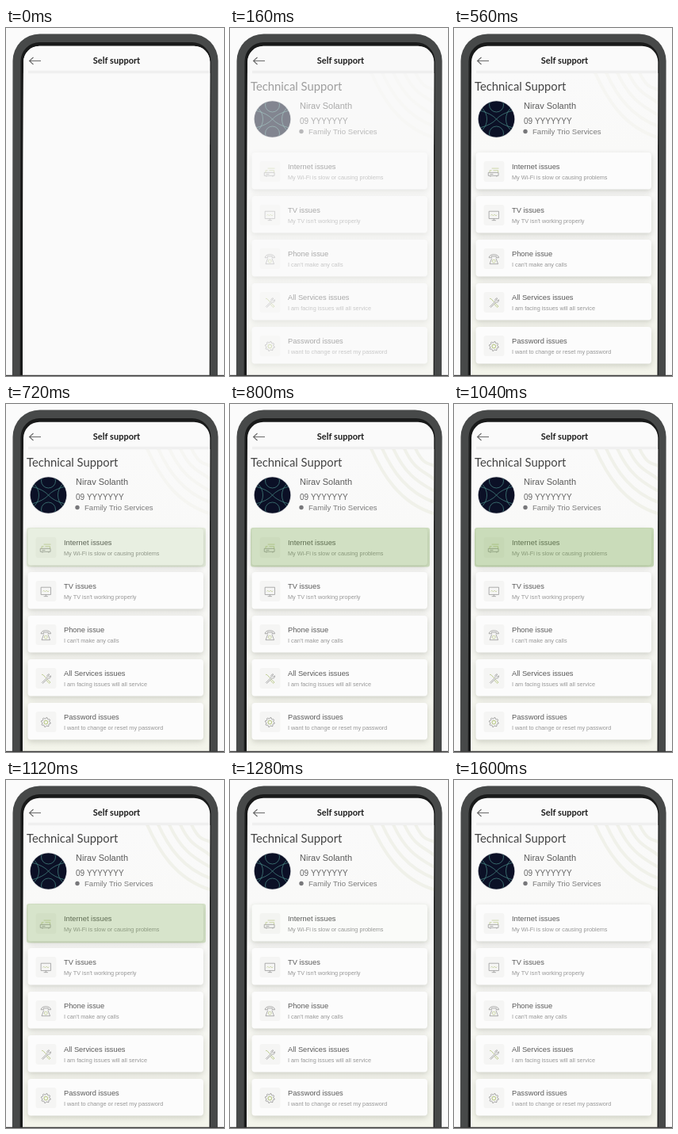
An HTML page with a canvas for the animation above (3040 ms loop, 275 by 439 pixels).

```html
<!DOCTYPE html>
<html lang="en">
<head>
<meta charset="utf-8">
<title>Self support</title>
<style>
html, body { margin: 0; width: 100%; height: 100%; overflow: hidden; background: #fbfbfb; }
canvas { display: block; width: 100vw; height: 100vh; }
</style>
</head>
<body>
<canvas id="stage"></canvas>
<script>
const W = 275, H = 439, LOOP = 3040, STEP = 80;
const SANS = '"Liberation Sans", Arial, sans-serif';
const LATO = 'Lato, "Open Sans", sans-serif';
const canvas = document.getElementById('stage');
const ctx = canvas.getContext('2d');

const CARDS = [
  ['Internet issues', 'My Wi-Fi is slow or causing problems', router],
  ['TV issues', "My TV isn't working properly", tv],
  ['Phone issue', "I can't make any calls", phone],
  ['All Services issues', 'I am facing issues will all service', tools],
  ['Password issues', 'I want to change or reset my password', gear]
];
const GREY = '#8f8f8f', GREEN = '#b9c886', TEAL = 'rgba(84,160,152,.75)';

// Highlight strength over time: [ms, amount]
const GLOW = [[640, 0], [720, 0.38], [800, 0.78], [880, 1], [960, 1],
  [1040, 0.9], [1120, 0.68], [1200, 0.32], [1280, 0.04], [1360, 0]];

function lerpKeys(keys, t) {
  if (t <= keys[0][0]) return keys[0][1];
  for (let i = 1; i < keys.length; i++) {
    const [t0, a] = keys[i - 1], [t1, b] = keys[i];
    if (t <= t1) return a + (b - a) * (t - t0) / (t1 - t0);
  }
  return keys[keys.length - 1][1];
}

function box(x, y, w, h, r, fill) {
  ctx.beginPath();
  ctx.roundRect(x, y, w, h, r);
  ctx.fillStyle = fill;
  ctx.fill();
}

function dot(x, y, r, fill) {
  ctx.beginPath();
  ctx.arc(x, y, r, 0, Math.PI * 2);
  ctx.fillStyle = fill;
  ctx.fill();
}

function ring(x, y, r, color, width = 0.8) {
  ctx.beginPath();
  ctx.arc(x, y, r, 0, Math.PI * 2);
  ctx.strokeStyle = color;
  ctx.lineWidth = width;
  ctx.stroke();
}

function line(d, color, width = 0.8) {
  ctx.strokeStyle = color;
  ctx.lineWidth = width;
  ctx.stroke(new Path2D(d));
}

function label(str, x, y, font, color, align = 'left') {
  ctx.font = font;
  ctx.fillStyle = color;
  ctx.textAlign = align;
  ctx.fillText(str, x, y);
}

function linear(x0, y0, x1, y1, ...colors) {
  const g = ctx.createLinearGradient(x0, y0, x1, y1);
  colors.forEach((c, i) => g.addColorStop(i / (colors.length - 1), c));
  return g;
}

// Icons are centred on the origin
function router() {
  line('M-8 1H6.5V5.5H-8ZM-5 5.5V7M4 5.5V7M-5.5 3.3H-1', GREY);
  line('M-6 1V-2H-3M-3-5H7M-1-2H6V1', GREEN);
}

function tv() {
  line('M-7-6H7V4.5H-7ZM-3 7H3M0 4.5V7', GREY);
  line('M-4.5 0L-3-1.5L-1 .5L1-1.5L3 .5L4.5-1', GREEN);
}

function phone() {
  line('M-7-2C-7-8 7-8 7-2H3.4V-4H-3.4V-2Z', GREY);
  line('M-3-1L-6 7H6L3-1', GREY);
  ring(0, 3, 2.2, GREEN);
}

function tools() {
  line('M-6 6L2-2M-4.6 7L3.2-.6M2-2C1-6 4-7 5-6.2L3.5-4L5-2.5L7-4.2C7.5-1 5 0 3.2-.6', GREY);
  line('M-6-6L-4-5.5L.5-.8M2 1L6.5 5.2L5 6.7L.7 2.5', GREEN, 1);
}

function gear() {
  ctx.beginPath();
  for (let i = 0; i < 32; i++) {
    const a = (i + 0.5) * Math.PI / 16, r = i % 4 < 2 ? 6.8 : 5.2;
    ctx.lineTo(r * Math.cos(a), r * Math.sin(a));
  }
  ctx.closePath();
  ctx.strokeStyle = GREY;
  ctx.lineWidth = 0.9;
  ctx.stroke();
  ring(0, 0, 2.6, GREEN, 1.3);
}

function avatar() {
  ctx.save();
  ctx.translate(53.5, 115);
  dot(0, 0, 23.6, '#d9dadc');
  dot(0, 0, 22.8, '#0b1026');
  ctx.clip();
  for (const s of [-1, 1]) {
    ring(0, 18 * s, 9, TEAL);
    ring(31 * s, 0, 19, TEAL);
    line(`M-21 ${-11 * s}Q-6 ${-7 * s} 0 0T21 ${11 * s}`, TEAL);
  }
  ctx.restore();
}

function phonePath(x0, x1, y, r, lean) {
  ctx.beginPath();
  ctx.moveTo(x0 - lean, H + 2);
  ctx.lineTo(x0, y + r);
  ctx.arcTo(x0, y, x0 + r, y, r);
  ctx.lineTo(x1 - r, y);
  ctx.arcTo(x1, y, x1, y + r, r);
  ctx.lineTo(x1 - lean, H + 2);
  ctx.closePath();
}

function screenPath() {
  phonePath(22, 257.3, 22.8, 20, 1);
}

function body() {
  phonePath(8.5, 267.6, 7.4, 34, 0.6);
  ctx.fillStyle = '#474949';
  ctx.fill();
  phonePath(18.5, 258.6, 18, 24, 0.8);
  ctx.fillStyle = '#191a1a';
  ctx.fill();
  screenPath();
  ctx.fillStyle = '#fafafa';
  ctx.fill();
}

function waves(strength) {
  ctx.save();
  ctx.beginPath();
  ctx.rect(170, 57, 90, 90);
  ctx.clip();
  for (let i = 0; i < 5; i++) {
    const x = 177 + i * 14, y = 139 - i * 14;
    line(`M${x} 54C${x + 14} 86 ${x + 36 - i * 3} ${y - 13} 260 ${y}`,
      `rgba(205,213,180,${0.23 * strength})`, 4);
  }
  ctx.restore();
}

function card([title, note, icon], i) {
  const y = 157 + i * 55;
  ctx.save();
  ctx.shadowColor = 'rgba(85,88,72,.24)';
  ctx.shadowBlur = 7 * canvas.width / W;
  ctx.shadowOffsetY = 2.8 * canvas.height / H;
  box(27.5, y, 221.5, 46.5, 4, '#fcfcfc');
  ctx.restore();
  box(37.5, y + 11, 26, 26, 3, '#f5f5f4');
  ctx.save();
  ctx.translate(50.3, y + 24.5);
  ctx.scale(0.88, 0.88);
  icon();
  ctx.restore();
  label(title, 73, y + 21, `9.3px ${SANS}`, '#5a5a5a');
  label(note, 73, y + 34.2, `7.3px ${SANS}`, '#979797');
}

function content(t) {
  ctx.fillStyle = linear(0, 57, 0, H, '#fafafa', '#f8f8f6', '#f3f4ea');
  ctx.fillRect(21, 57, 238, H - 57);
  waves(t < 800 ? 0.5 : 1);

  label('Technical Support', 26, 79, `14.8px ${LATO}`, '#444');
  avatar();
  label('Nirav Solanth', 88, 102, `11px ${SANS}`, '#5a5a5a');
  label('09 YYYYYYY', 88, 121.2, `10px ${SANS}`, '#666');
  dot(90, 130.5, 2.7, '#77777a');
  label('Family Trio Services', 99, 134.3, `9.6px ${SANS}`, '#7a7a7a');

  CARDS.forEach(card);
  const glow = lerpKeys(GLOW, t);
  if (glow > 0) box(26, 156, 226, 49.5, 3, `rgba(104,156,56,${0.37 * glow})`);
}

function header() {
  ctx.fillStyle = linear(0, 52.5, 0, 58.5, 'rgba(0,0,0,0)', 'rgba(0,0,0,.05)', 'rgba(0,0,0,0)');
  ctx.fillRect(28, 52.5, 228, 6);
  line('M44 41.5H29.5M34.5 37L29.5 41.5L34.5 46', '#6a6a6a', 1.1);
  label('Self support', 139.5, 44.8, `bold 11px ${LATO}`, '#1c1c1c', 'center');
}

function draw(t) {
  ctx.setTransform(canvas.width / W, 0, 0, canvas.height / H, 0, 0);
  ctx.fillStyle = '#fbfbfb';
  ctx.fillRect(0, 0, W, H);
  body();
  ctx.save();
  screenPath();
  ctx.clip();
  content(t);
  // A veil thins out as the page appears
  const veil = 1 - Math.min(1, t / 320);
  ctx.fillStyle = `rgba(250,250,250,${veil})`;
  ctx.fillRect(20, 20, 240, H);
  header();
  ctx.restore();
  ctx.fillStyle = '#3c3c3c';
  ctx.fillRect(0, H - 1.2, W, 1.2);
}

function resize() {
  const dpr = window.devicePixelRatio || 1;
  canvas.width = Math.round(innerWidth * dpr);
  canvas.height = Math.round(innerHeight * dpr);
}

const start = performance.now();
function tick() {
  const t = (performance.now() - start) % LOOP;
  draw(Math.floor(t / STEP) * STEP);
  requestAnimationFrame(tick);
}

addEventListener('resize', resize);
resize();
tick();
</script>
</body>
</html>
```
